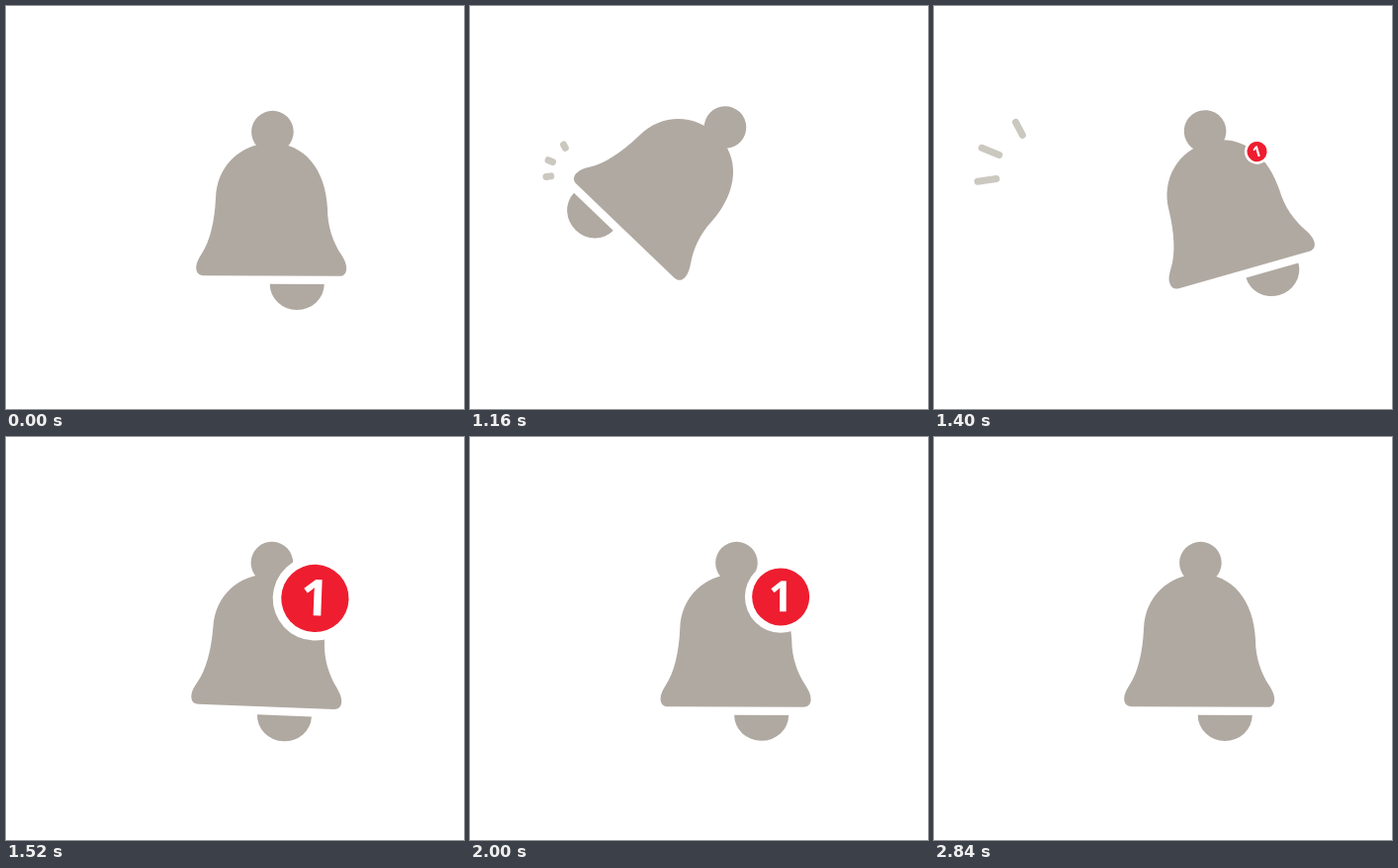
An HTML page that plays this animation: 463 px wide and 407 px high, repeating every 3160 ms.

```html
<!DOCTYPE html>
<html lang="en">
<head>
<meta charset="utf-8">
<title>Bell notification</title>
<style>
  html, body { margin: 0; width: 100%; height: 100%; overflow: hidden; background: #fff; }
  svg { display: block; width: 100vw; height: 100vh; }
  text { font: bold 43px "Open Sans", "Noto Sans", sans-serif; text-anchor: middle; fill: #fff; }
</style>
</head>
<body>
<svg viewBox="0 0 463 407">
  <g id="rays" transform="translate(109.5 168)" stroke="#cbc8c0" stroke-width="7" stroke-linecap="round">
    <line transform="rotate(172)"/>
    <line transform="rotate(202)"/>
    <line transform="rotate(242)"/>
  </g>
  <!-- The bell hangs from the origin of this group. -->
  <g id="bell" fill="#b0a9a1">
    <circle cy="16.6" r="21.3"/>
    <path d="M0 28C-32 28-56 51-57 83C-58 108-63 128-71 140C-74 145-76.5 149-76.5 154
      C-76.5 159-74 162-69 162H68C73 162 75.5 159 75.5 154C75.5 149 73 145 70 140
      C62 128 56 112 56 94C54 54 32 28 0 28Z"/>
    <path id="clapper" d="M-27.5 0A27.5 26 0 0 0 27.5 0Z"/>
    <g id="badge">
      <circle r="36" fill="#fff"/>
      <circle r="28.8" fill="#ee1d2f"/>
      <text y="14.7">1</text>
    </g>
  </g>
</svg>
<script>
const LOOP = 3160, STEP = 40;
const TILT = 0.3;               // resting angle of the bell, degrees
const RAY_IN = 28, RAY_OUT = 66; // distances from the centre of the fan

const [bell, clapper, badge, rays] =
  ['bell', 'clapper', 'badge', 'rays'].map(id => document.getElementById(id));

// Cosine ease from 0 to 1 between two times.
function ease(t, from, to) {
  const k = Math.min(1, Math.max(0, (t - from) / (to - from)));
  return (1 - Math.cos(Math.PI * k)) / 2;
}

// Sum of eased moves through [time, value] keys.
function through(t, ...keys) {
  return keys.slice(1).reduce(
    (sum, [time, value], i) => sum + (value - keys[i][1]) * ease(t, keys[i][0], time),
    keys[0][1]);
}

// Damped oscillation: 1 until time zero, then dying away around 0.
function ring(t, half, decay) {
  return t < 0 ? 1 : Math.exp(-t / decay) * Math.cos(Math.PI * t / half);
}

function draw(t) {
  const swing = through(t, [920, 0], [1160, 43.5], [1300, -43.8], [1480, 3.2]) * ring(t - 1480, 160, 190);
  bell.setAttribute('transform', `translate(269.5 110.5) rotate(${TILT + swing})`);

  const slide = through(t, [912, 25.6], [1160, -37], [1340, 29], [1540, 18], [2000, 25.6]);
  clapper.setAttribute('transform', `translate(${slide} 170.3)`);

  const size = (1 - ring(t - 1363, 220, 130)) * (1 - ease(t, 2640, 2840));
  badge.style.display = size > 0 ? '' : 'none';
  badge.setAttribute('transform', `translate(44.8 50.8) scale(${size})`);

  const head = ease(t, 1100, 1360), tail = ease(t, 1320, 1480);
  rays.style.display = head > 0 && tail < 1 ? '' : 'none';
  [...rays.children].forEach((ray, i) => {
    const length = (RAY_OUT - RAY_IN) * (i < 2 ? 1 : 0.77);
    ray.setAttribute('x1', RAY_IN + length * tail);
    ray.setAttribute('x2', RAY_IN + length * head);
  });
}

const start = performance.now();
function frame() {
  const t = (performance.now() - start) % LOOP;
  draw(Math.floor(t / STEP) * STEP);
  requestAnimationFrame(frame);
}
frame();
</script>
</body>
</html>
```
